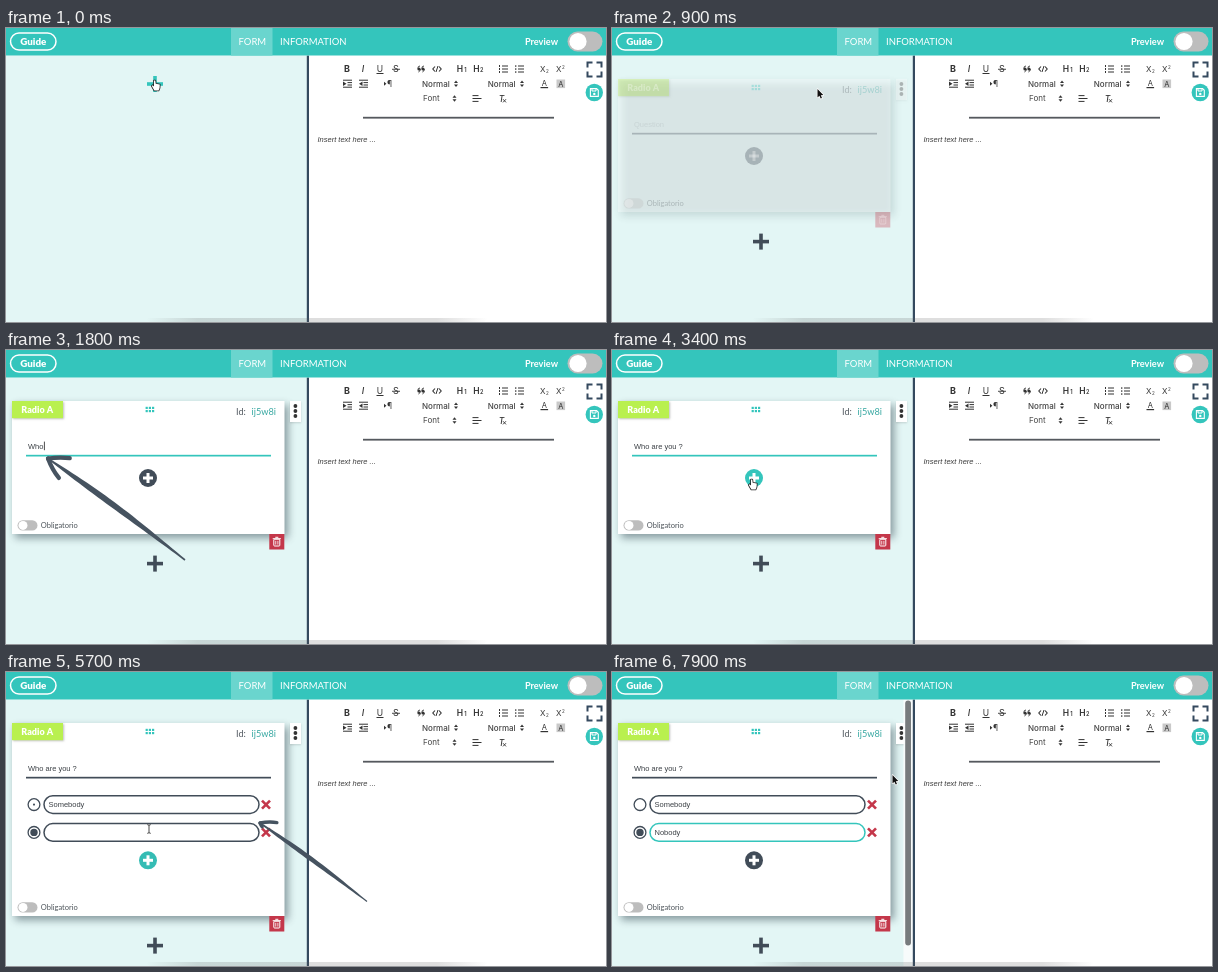
An HTML page with a canvas that plays this animation: 600x294 px, repeating every 8 s.

```html
<!DOCTYPE html>
<html lang="en">
<head>
<meta charset="utf-8">
<title>Form builder</title>
<style>
html, body { margin: 0; width: 100%; height: 100%; overflow: hidden; background: #fff; }
canvas { display: block; width: 600px; height: 294px; }
</style>
</head>
<body>
<canvas id="stage"></canvas>
<script>
const LOOP = 8000;
const TEAL = '#34c5bc', INK = '#414c58', MINT = '#e3f6f5', RED = '#c4374a', GRAY = '#bdbdbd';
const LATO = 'Lato, sans-serif', SANS = '"Liberation Sans", Arial, sans-serif', INTER = 'Inter, sans-serif';

const canvas = document.getElementById('stage');
const ctx = canvas.getContext('2d');
const dpr = window.devicePixelRatio || 1;
canvas.width = 600 * dpr;
canvas.height = 294 * dpr;

// ---------- helpers ----------
const clamp = v => Math.max(0, Math.min(1, v));
const ramp = (t, a, b) => clamp((t - a) / (b - a));
const lerp = (a, b, k) => a + (b - a) * k;
const ease = k => k * k * (3 - 2 * k);
const between = (t, a, b) => t >= a && t < b;

function mix(a, b, k) {
  const rgb = c => [1, 3, 5].map(i => parseInt(c.slice(i, i + 2), 16));
  const p = rgb(a), q = rgb(b);
  return `rgb(${p.map((v, i) => Math.round(lerp(v, q[i], k)))})`;
}
function rect(x, y, w, h, color) {
  ctx.fillStyle = color;
  ctx.fillRect(x, y, w, h);
}
function pill(x, y, w, h, fill, stroke, lw = 1.4, r = h / 2) {
  ctx.beginPath();
  ctx.roundRect(x, y, w, h, r);
  if (fill) { ctx.fillStyle = fill; ctx.fill(); }
  if (stroke) { ctx.strokeStyle = stroke; ctx.lineWidth = lw; ctx.stroke(); }
}
function disc(x, y, r, color) {
  ctx.beginPath();
  ctx.arc(x, y, r, 0, 7);
  ctx.fillStyle = color;
  ctx.fill();
}
function line(color, lw, ...pts) {
  ctx.beginPath();
  for (let i = 0; i < pts.length; i += 2) ctx.lineTo(pts[i], pts[i + 1]);
  ctx.strokeStyle = color;
  ctx.lineWidth = lw;
  ctx.stroke();
}
function shape(fill, stroke, lw, ...pts) {
  ctx.beginPath();
  for (let i = 0; i < pts.length; i += 2) ctx.lineTo(pts[i], pts[i + 1]);
  ctx.closePath();
  if (stroke) { ctx.strokeStyle = stroke; ctx.lineWidth = lw; ctx.stroke(); }
  if (fill) { ctx.fillStyle = fill; ctx.fill(); }
}
function text(str, x, y, font, color, align = 'left') {
  ctx.font = font;
  ctx.fillStyle = color;
  ctx.textAlign = align;
  ctx.fillText(str, x, y);
  return ctx.measureText(str).width;
}
function plus(x, y, r, w, color) {
  rect(x - r, y - w / 2, r * 2, w, color);
  rect(x - w / 2, y - r, w, r * 2, color);
}
function faded(alpha, draw) {
  if (alpha <= 0) return;
  ctx.save();
  ctx.globalAlpha *= alpha;
  draw();
  ctx.restore();
}
function shadowed(dx, dy, blur, color, draw) {
  ctx.save();
  ctx.shadowColor = color;
  ctx.shadowBlur = blur * dpr;
  ctx.shadowOffsetX = dx * dpr;
  ctx.shadowOffsetY = dy * dpr;
  draw();
  ctx.restore();
}

// ---------- header and editor ----------
function header() {
  rect(0, 0, 600, 27.5, TEAL);
  rect(225, 0, 41.5, 27.5, '#6ad5ce');
  pill(4.5, 5, 45.5, 17, null, '#fff', 1.5);
  text('Guide', 27.3, 17, `900 9.8px ${LATO}`, '#fff', 'center');
  text('FORM', 232.5, 17.2, `9.5px ${LATO}`, '#fff');
  text('INFORMATION', 274, 17.2, `9.5px ${LATO}`, '#fff');
  text('Preview', 552, 17, `bold 9.2px ${LATO}`, '#fff', 'right');
  pill(561.5, 3.5, 35, 20, GRAY);
  disc(572, 13.5, 8.6, '#fff');
}
function listIcon(x, y, numbered) {
  for (const dy of [-3, 0, 3]) {
    rect(x - 1.5, y + dy - 0.5, 6, 1, '#333');
    rect(x - 4.5, y + dy - (numbered ? 1 : 0.6), numbered ? 1 : 1.4, numbered ? 2 : 1.3, '#333');
  }
}
function indentIcon(x, y, dir) {
  rect(x - 4.5, y - 4, 9, 1, '#333');
  rect(x - 4.5, y + 3, 9, 1, '#333');
  rect(x, y - 1.6, 4.5, 1, '#333');
  rect(x, y + 0.8, 4.5, 1, '#333');
  const tip = dir > 0 ? -1 : -4.5, back = dir > 0 ? -4.5 : -1;
  shape('#333', null, 0, x + back, y - 2.2, x + tip, y, x + back, y + 2.2);
}
function sorter(x, y) {
  shape('#333', null, 0, x - 2, y - 0.8, x, y - 3.2, x + 2, y - 0.8);
  shape('#333', null, 0, x - 2, y + 0.8, x, y + 3.2, x + 2, y + 0.8);
}
function toolbar() {
  const c = '#333';
  const glyph = (s, x, y, style = '', size = 9) => text(s, x, y, `${style} ${size}px ${INTER}`, c, 'center');
  glyph('B', 341, 44.2, 'bold');
  glyph('I', 357, 44.2, 'italic 500');
  glyph('U', 374, 43.6, '', 8.5);
  rect(370.5, 45, 7, 1, c);
  glyph('S', 390, 44.2);
  rect(386, 40.8, 8, 0.9, c);
  for (const x of [413, 417]) {
    disc(x, 41, 1.6, c);
    line(c, 0.9, x - 1.2, 40.5, x - 0.6, 38.6, x + 1, 38);
    line(c, 0.9, x + 1.4, 41, x + 0.8, 43, x - 0.6, 44);
  }
  line(c, 1.1, 429, 38.5, 426.8, 41, 429, 43.5);
  line(c, 1.1, 433, 38.5, 435.2, 41, 433, 43.5);
  line(c, 1, 432, 38, 430, 44);
  [['1', 455.5], ['2', 472]].forEach(([n, x]) => {
    glyph('H', x - 1.5, 44.2, '600', 8.5);
    glyph(n, x + 3.8, 44.4, '600', 5.5);
  });
  listIcon(497.5, 41, true);
  listIcon(513.5, 41, false);
  glyph('X', 536.8, 43.8, '', 8);
  glyph('2', 541.4, 45.2, '', 4.5);
  glyph('X', 552.8, 44.2, '', 8);
  glyph('2', 557.4, 40.5, '', 4.5);

  indentIcon(341.5, 55.7, 1);
  indentIcon(357.5, 55.7, -1);
  shape(c, null, 0, 378, 53.8, 380.4, 55.8, 378, 57.8);
  glyph('¶', 383.6, 59, '', 8.5);
  text('Normal', 416, 58.8, `500 8px ${INTER}`, '#444');
  sorter(450, 55.8);
  text('Normal', 481.8, 58.8, `500 8px ${INTER}`, '#444');
  sorter(516, 55.8);
  glyph('A', 538.3, 58, '', 7.5);
  rect(534.5, 59, 7.6, 1.2, c);
  rect(550.5, 51.5, 8.6, 8.6, '#c9c9c9');
  glyph('A', 554.8, 58.6, '', 7.5);

  text('Font', 417, 73.4, `8px ${INTER}`, '#444');
  sorter(448.5, 70.5);
  [[-3.4, 6], [-0.5, 9], [2.4, 6]].forEach(([dy, w]) => rect(466.5, 70.5 + dy, w, 1, c));
  glyph('T', 495.5, 73.6, 'italic 500', 8.5);
  line(c, 0.9, 497, 71.2, 500, 74.4);
  line(c, 0.9, 500, 71.2, 497, 74.4);
}
function editor() {
  rect(303, 27.5, 297, 267, '#fff');
  toolbar();
  rect(357, 88.8, 191, 1.8, '#55595e');
  text('Insert text here ...', 311.5, 114.4, `italic 7.5px ${SANS}`, '#3a3a3a');
  for (const [sx, sy] of [[-1, -1], [1, -1], [1, 1], [-1, 1]]) {
    const x = 588.5 + sx * 7, y = 41.6 + sy * 7;
    line('#34495e', 2, x - sx * 5, y, x, y, x, y - sy * 5);
  }
  disc(588.3, 64.5, 8.7, TEAL);
  shape(null, '#fff', 1.1, 584.4, 60.6, 590.6, 60.6, 592.3, 62.3, 592.3, 68.4, 584.4, 68.4);
  line('#fff', 1, 586, 60.8, 586, 63, 590, 63, 590, 60.8);
  disc(588.3, 65.9, 1.2, '#fff');
}

// ---------- form card ----------
function typed(str, t, times) {
  return str.slice(0, times.filter(k => t >= k).length);
}
function field(str, x, y, caret) {
  const w = text(str, x, y, `7.5px ${SANS}`, '#3c4146');
  if (caret) rect(x + w + 0.5, y - 7, 0.8, 8.6, '#222');
}
function plusButton(y, color) {
  disc(142, y, 9, color);
  plus(142, y, 5, 3, '#fff');
}
function trash(x, y) {
  rect(x, y, 15, 15.5, RED);
  pill(x + 4.5, y + 5.2, 6, 6.8, null, '#fff', 1, 0.8);
  rect(x + 3.4, y + 4.2, 8.2, 1, '#fff');
  rect(x + 6, y + 2.8, 3, 1, '#fff');
  rect(x + 6.1, y + 6.8, 0.8, 3.8, '#fff');
  rect(x + 8.2, y + 6.8, 0.8, 3.8, '#fff');
}
function option(y, str, dot, focus, caret) {
  ctx.beginPath();
  ctx.arc(28, y, 5.9, 0, 7);
  ctx.strokeStyle = INK;
  ctx.lineWidth = 1.3;
  ctx.stroke();
  if (dot > 0) disc(28, y, 3.7 * dot, INK);
  pill(38, y - 8.8, 215, 17.6, '#fff', mix(INK, TEAL, focus), 1.5);
  field(str, 42.5, y + 2.6, caret);
  for (const s of [-1, 1]) line(RED, 2.7, 256, y - 4 * s, 264, y + 4 * s);
}
function card(t, bottom) {
  shadowed(3, 4, 8, 'rgba(40,60,70,.5)', () => rect(6, 51, 272.5, bottom - 51, '#fff'));
  shadowed(0.5, 1, 2, 'rgba(0,0,0,.25)', () => rect(6, 51, 51, 17.2, '#b9f04f'));
  text('Radio A', 31.2, 63, `900 9px ${LATO}`, '#fff', 'center');
  for (let i = 0; i < 6; i++) rect(139.6 + (i % 3) * 3.2, 56.8 + (i > 2 ? 3.2 : 0), 2.2, 2.2, TEAL);
  text('Id:', 230, 65, `9.2px ${LATO}`, '#555c63');
  text('ij5w8i', 245.5, 65, `9.2px ${LATO}`, '#38a8a2');
  shadowed(0, 1, 2, 'rgba(0,0,0,.15)', () => rect(284, 51, 11, 21, '#fff'));
  for (const y of [56, 61, 66]) disc(289.4, y, 1.9, '#333');

  const question = typed('Who are you ?', t, [1550, 1650, 1750, 1850, 1880, 1980, 2080, 2180, 2350, 2370, 2400, 2460, 2480]);
  const focus = ramp(t, 1250, 1450) * (1 - ramp(t, 3560, 3750));
  rect(20, 104.8, 245, 1.7, mix(INK, TEAL, focus));
  if (question) field(question, 22, 98.6, t < 2500);
  else {
    text('Question', 22, 98.6, `7.5px ${SANS}`, '#a9b0b5');
    if (between(t, 1300, 1550)) field('', 22, 98.6, true);
  }

  faded(ramp(t, 3580, 3800), () => {
    const answer = typed('Somebody', t, [4270, 4370, 4470, 4560, 4660, 4760, 4860, 4960]);
    const lit = ramp(t, 3900, 4050) * (1 - ramp(t, 5450, 5600));
    option(132.6, answer, 1 - ramp(t, 5500, 5780), lit, between(t, 4000, 5150));
  });
  faded(ramp(t, 5460, 5640), () => {
    const answer = typed('Nobody', t, [6350, 6450, 6650, 6750, 6950, 7050]);
    option(160.4, answer, 1, ramp(t, 5950, 6150), between(t, 6050, 7350));
  });

  const hover = Math.max(
    ramp(t, 3120, 3300) * (1 - ramp(t, 3620, 3850)),
    ramp(t, 5120, 5280) * (1 - ramp(t, 5680, 5950)));
  plusButton(bottom - 56 + (bottom > 200 ? 0.3 : 0), mix(INK, TEAL, hover));

  pill(11.5, bottom - 13.8, 20, 10.4, GRAY);
  disc(17, bottom - 8.6, 4.5, '#fff');
  text('Obligatorio', 34.8, bottom - 5.6, `7.5px ${LATO}`, '#4c5359');
  trash(263.3, bottom);
}

// ---------- overlays ----------
// Hand-drawn arrow along +x from tail to tip; barbs come last.
function arrow(tailX, tailY, tipX, tipY, p) {
  if (p <= 0) return;
  const len = Math.hypot(tipX - tailX, tipY - tailY), k = len / 168;
  const n = 30, shaft = ramp(p, 0, 0.6), top = [], under = [];
  ctx.save();
  ctx.translate(tailX, tailY);
  ctx.rotate(Math.atan2(tipY - tailY, tipX - tailX));
  ctx.fillStyle = ctx.strokeStyle = '#465360';
  for (let i = 0; i <= n; i++) {
    const u = i / n * shaft;
    const half = (0.8 + 2.1 * Math.sin(Math.PI * Math.pow(u, 1.2))) * k;
    const bow = Math.sin(Math.PI * u) * 1.5 * k;
    top.push(u * len, bow - half);
    under.unshift(u * len, bow + half);
  }
  shape('#465360', null, 0, ...top, ...under);
  ctx.lineCap = 'round';
  ctx.lineWidth = 4.2 * k;
  const barb = (q, dx, dy, bend) => {
    if (q <= 0) return;
    ctx.beginPath();
    ctx.moveTo(len, 0);
    ctx.quadraticCurveTo(len + dx * q / 2, dy * q / 2 + bend * q, len + dx * q, dy * q);
    ctx.stroke();
  };
  barb(ramp(p, 0.6, 0.8), -17 * k, 13 * k, 2);
  barb(ramp(p, 0.8, 1), -20 * k, -9 * k, -2);
  ctx.restore();
}

// time, x, y, kind (empty = hidden while typing)
const PATH = [
  [0, 149, 56, 'hand'], [600, 149, 56, 'hand'], [640, 152, 57, 'arrow'], [900, 206, 62, 'arrow'],
  [1000, 200, 65, 'arrow'], [1200, 132, 96, 'beam'], [1500, 131, 103, ''], [2440, 131, 106, 'beam'],
  [2750, 131, 106, 'beam'], [2950, 136, 117, 'arrow'], [3100, 140, 133, 'hand'], [3640, 140, 133, 'hand'],
  [3700, 140, 133, 'beam'], [4200, 143, 134, ''], [4980, 143, 136, 'beam'], [5080, 142, 150, 'arrow'],
  [5150, 141, 159, 'hand'], [5500, 141, 159, 'hand'], [5540, 142, 158, 'beam'], [5700, 143, 157, 'beam'],
  [6300, 143, 157, ''], [7420, 143, 157, 'beam'], [7560, 143, 157, 'beam'], [7680, 196, 130, 'arrow'],
  [7880, 281, 104, 'arrow'], [8000, 281, 104, 'arrow']];

function pointer(t) {
  const i = Math.max(0, PATH.findIndex(k => k[0] > t) - 1);
  const [t0, x0, y0, kind] = PATH[i], [t1, x1, y1] = PATH[i + 1];
  const q = ease(ramp(t, t0, t1));
  ctx.save();
  ctx.translate(lerp(x0, x1, q), lerp(y0, y1, q));
  ctx.lineJoin = 'round';
  if (kind === 'arrow') {
    shape('#111', '#fff', 1.4, -0.5, -1, -0.5, 7.4, 1.4, 5.7, 2.7, 8.6, 4, 8, 2.8, 5.2, 5.3, 5);
  } else if (kind === 'beam') {
    line('#333', 0.9, 0, -4, 0, 4);
    line('#333', 0.8, -1.8, -4.4, 0, -3.8, 1.8, -4.4);
    line('#333', 0.8, -1.8, 4.4, 0, 3.8, 1.8, 4.4);
  } else if (kind === 'hand') {
    shape('#fff', '#222', 1.6, -1, -3.5, 0.3, -3.5, 0.7, -0.3, 4.8, 0.6, 4.6, 4, 3.6, 6.5,
      -0.6, 6.5, -3.2, 2, -2.4, 1.2, -1, 2.4);
  }
  ctx.restore();
}
function dockShade() {
  const g = ctx.createLinearGradient(140, 0, 482, 0);
  [[0, 0], [0.15, 0.2], [0.85, 0.2], [1, 0]].forEach(([at, a]) => g.addColorStop(at, `rgba(90,90,90,${a})`));
  for (let i = 0; i < 4; i++) rect(140 + i, 290 + i, 342 - i * 2, 1, g);
}

// ---------- scene ----------
function draw(t) {
  ctx.setTransform(dpr, 0, 0, dpr, 0, 0);
  ctx.textBaseline = 'alphabetic';
  rect(0, 0, 600, 294, '#fff');
  rect(0, 27.5, 301, 267, MINT);
  editor();

  const bottom = t < 3580 ? 184 : t < 5460 ? 217 : 244;
  faded(ramp(t, 690, 1350), () => card(t, bottom));
  plus(149, t < 600 ? 56 : bottom + 29.6, 8, 3.6, mix(TEAL, INK, ramp(t, 600, 800)));

  faded(ramp(t, 7580, 7750), () => {
    rect(291.5, 27.5, 9.5, 267, 'rgba(250,252,252,.9)');
    pill(293.2, 28.5, 5.8, 245, '#777b7d');
  });
  rect(300.8, 27.5, 2.2, 267, '#34495e');
  header();
  dockShade();

  arrow(179, 210, 42, 108.5, ramp(t, 1300, 1700) * (1 - ramp(t, 2780, 3150)));
  arrow(361, 229.5, 254, 151, ramp(t, 3950, 4350) * (1 - ramp(t, 5640, 6050)));
  pointer(t);
}
function tick(now) {
  draw(now % LOOP);
  requestAnimationFrame(tick);
}
draw(0);
requestAnimationFrame(tick);
</script>
</body>
</html>
```
